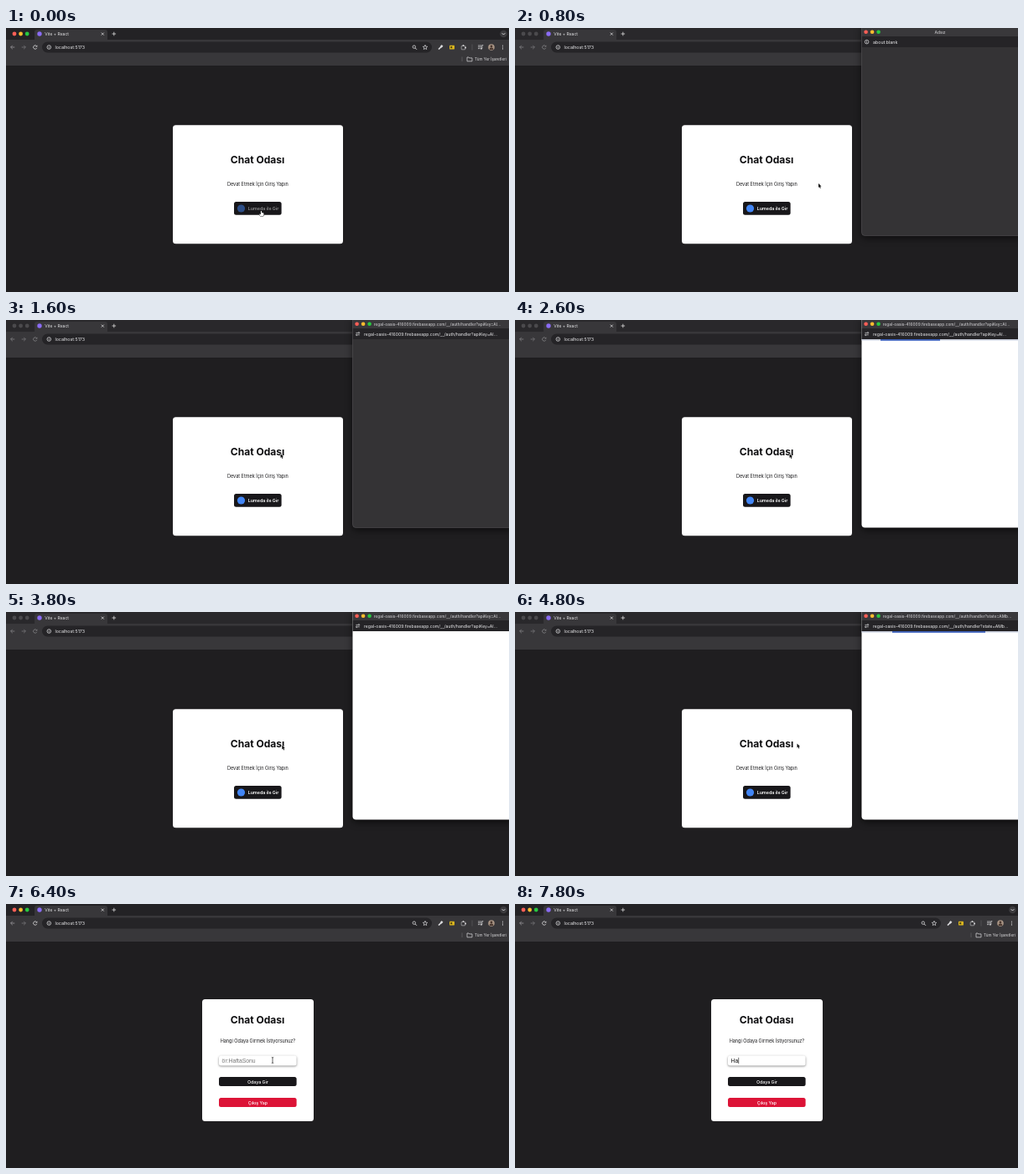
Animation of 600x316 px, one loop 8 s. Source, as an HTML page with a canvas:

```html
<!DOCTYPE html>
<html lang="tr">
<head>
<meta charset="utf-8">
<title>Chat Odası</title>
<style>
html, body { margin: 0; width: 100%; height: 100%; overflow: hidden; background: #1f1e20; }
canvas { display: block; width: 600px; height: 316px; }
</style>
</head>
<body>
<canvas id="stage"></canvas>
<script>
const W = 600, H = 316, LOOP = 8000, STEP = 200;
const canvas = document.getElementById('stage');
const ctx = canvas.getContext('2d');
const ratio = window.devicePixelRatio || 1;
canvas.width = W * ratio;
canvas.height = H * ratio;

const UI = 'Inter, "Noto Sans", sans-serif';
const INPUT = '"Liberation Sans", Arial, sans-serif';
const BAR = '#38373a', FIELD = '#252427', PAGE = '#1f1e20';
const LIGHTS = ['#ff5f57', '#febc2e', '#28c840'];
const HOST = 'regal-oasis-416009.firebaseapp.com/__/auth/handler?';

// Pointer path: time, x, y of the tip
const PATH = [
  [0, 304.5, 219], [600, 304.5, 219], [800, 362, 186], [1000, 429, 146.5],
  [1200, 408, 152], [1400, 352, 159], [1600, 327.5, 160], [3600, 327.5, 160],
  [4600, 336.5, 157.5], [5000, 336.5, 157.5], [5800, 318, 187], [8000, 318, 187]
];

function box(x, y, w, h, r, fill, stroke) {
  ctx.beginPath();
  ctx.roundRect(x, y, w, h, r);
  if (fill) { ctx.fillStyle = fill; ctx.fill(); }
  if (stroke) { ctx.strokeStyle = stroke; ctx.lineWidth = 0.5; ctx.stroke(); }
}

function dot(x, y, r, fill) {
  ctx.beginPath();
  ctx.arc(x, y, r, 0, Math.PI * 2);
  ctx.fillStyle = fill;
  ctx.fill();
}

function ring(x, y, r, color, from = 0, to = Math.PI * 2) {
  ctx.beginPath();
  ctx.arc(x, y, r, from, to);
  ctx.strokeStyle = color;
  ctx.lineWidth = 0.8;
  ctx.stroke();
}

function line(color, width, ...pts) {
  ctx.beginPath();
  for (let i = 0; i < pts.length; i += 2) ctx.lineTo(pts[i], pts[i + 1]);
  ctx.strokeStyle = color;
  ctx.lineWidth = width;
  ctx.stroke();
}

function shape(x, y, pts, fill, stroke, width = 0.6) {
  ctx.beginPath();
  for (let i = 0; i < pts.length; i += 2) ctx.lineTo(x + pts[i], y + pts[i + 1]);
  ctx.closePath();
  ctx.lineJoin = 'round';
  ctx.lineWidth = width;
  if (stroke) { ctx.strokeStyle = stroke; ctx.stroke(); }
  if (fill) { ctx.fillStyle = fill; ctx.fill(); }
}

function text(str, x, y, size, color, weight = 400, align = 'left', family = UI) {
  ctx.font = `${weight} ${size}px ${family}`;
  ctx.textAlign = align;
  ctx.fillStyle = color;
  ctx.fillText(str, x, y);
}

function withShadow(color, blur, dy, draw) {
  ctx.save();
  ctx.shadowColor = color;
  ctx.shadowBlur = blur * ratio;
  ctx.shadowOffsetY = dy * ratio;
  draw();
  ctx.restore();
}

function infoIcon(x, y) {
  ring(x, y, 2.3, '#d5d5d7');
  line('#d5d5d7', 0.8, x, y - 0.4, x, y + 1.3);
  dot(x, y - 1.1, 0.45, '#d5d5d7');
}

function tuneIcon(x, y) {
  const c = '#d5d5d7';
  line(c, 0.7, x - 2.2, y - 1.2, x + 0.2, y - 1.2);
  line(c, 0.7, x - 0.2, y + 1.2, x + 2.2, y + 1.2);
  ring(x + 1.3, y - 1.2, 0.8, c);
  ring(x - 1.3, y + 1.2, 0.8, c);
}

function star(x, y, r, color) {
  const pts = [];
  for (let i = 0; i < 10; i++) {
    const a = i * Math.PI / 5 - Math.PI / 2, d = i % 2 ? r * 0.45 : r;
    pts.push(d * Math.cos(a), d * Math.sin(a));
  }
  shape(x, y, pts, null, color, 0.7);
}

function toolIcons() {
  const c = '#dcdcde';
  ring(486.8, 22.6, 1.7, c);
  line(c, 0.9, 488.1, 23.9, 490, 25.8);
  star(500, 23.2, 2.9, c);
  line(c, 1.7, 516, 25.5, 519, 22.5);
  line(c, 2.4, 518.6, 22.8, 520.6, 20.8);
  box(529, 20.8, 6, 4.6, 0.6, '#d9b51f');
  box(530.2, 22, 2, 2.2, 0, '#54480f');
  box(543.2, 21.4, 4.6, 4.4, 0.6, null, c);
  dot(545.5, 20.9, 0.9, c);
  dot(548.1, 23.5, 0.9, c);
  line('#5d5d60', 0.7, 556, 19.5, 556, 26.5);
  for (let i = 0; i < 3; i++) line(c, 0.7, 563, 21 + i * 1.8, i < 2 ? 567 : 565.5, 21 + i * 1.8);
  line(c, 0.8, 567.8, 24.6, 567.8, 20.6, 569.3, 20.6);
  dot(567, 24.7, 0.9, c);
  dot(579, 23, 3.8, '#a89484');
  dot(579, 21.9, 1.4, '#4a3830');
  box(576.7, 23.6, 4.6, 2.4, [1.6, 1.6, 0.8, 0.8], '#4a3830');
  for (let i = -1; i < 2; i++) dot(592.5, 23 + i * 1.9, 0.6, c);
}

function browser(active) {
  ctx.fillStyle = PAGE;
  ctx.fillRect(0, 0, W, H);
  ctx.fillStyle = active ? '#232225' : '#29282b';
  ctx.fillRect(0, 0, W, 15);
  ctx.fillStyle = BAR;
  ctx.fillRect(0, 14, W, 31);
  for (let i = 0; i < 3; i++) dot(10 + i * 7.6, 7, 2.4, active ? LIGHTS[i] : '#4b4a4d');

  box(34, 2, 87, 13, [3, 3, 0, 0], BAR);
  dot(40, 7, 2.7, '#8b6cf6');
  text('Vite + React', 46.2, 9, 5, '#e6e6e8');
  line('#dcdcde', 0.8, 113.8, 5.6, 116.8, 8.6);
  line('#dcdcde', 0.8, 116.8, 5.6, 113.8, 8.6);
  line('#dcdcde', 0.8, 126.5, 7, 131.1, 7);
  line('#dcdcde', 0.8, 128.8, 4.7, 128.8, 9.3);
  dot(593.5, 7, 4.3, '#3c3b3e');
  line('#e6e6e8', 0.9, 591.7, 6.2, 593.5, 8, 595.3, 6.2);

  const back = active ? '#9a999c' : '#858487', dim = '#77767a';
  line(back, 0.8, 10.3, 23, 5.6, 23);
  line(back, 0.8, 7.8, 20.8, 5.6, 23, 7.8, 25.2);
  line(dim, 0.8, 18.7, 23, 23.4, 23);
  line(dim, 0.8, 21.2, 20.8, 23.4, 23, 21.2, 25.2);
  const reload = active ? '#dcdcde' : '#858487';
  ring(34.8, 23, 2.2, reload, 0.4, 5.4);
  shape(36.4, 20.4, [0.9, 0, 0.9, 2.1, -1.2, 2.1], reload);

  box(43, 16.5, 465, 13, 6.5, FIELD);
  infoIcon(51.3, 23);
  text('localhost:5173', 58.4, 25, 5.3, '#eeeef0');
  if (active) toolIcons();

  line('#68676a', 0.7, 544, 34.5, 544, 40);
  shape(550, 35, [0, 0, 2, 0, 2.8, 0.9, 6, 0.9, 6, 4.8, 0, 4.8], null, '#dcdcde', 0.7);
  text('Tüm Yer İşaretleri', 559, 39, 4.6, '#dcdcde');
}

function loginCard(hover) {
  box(199, 116.3, 203, 142, 3.5, '#fff');
  text('Chat Odası', 300, 162, 12, '#0c0c0e', 700, 'center');
  text('Devat Etmek İçin Giriş Yapın', 300.4, 189, 5.5, '#18181a', 400, 'center');
  box(272, 208, 56.6, 15.8, 2.5, '#18171a');
  ctx.globalAlpha = hover ? 0.5 : 1;
  dot(280.5, 216, 4.6, '#4285f4');
  text('Lumeda ile Gir', 288.8, 217.9, 5.3, '#fff', 600);
  ctx.globalAlpha = 1;
}

function roomCard(t) {
  box(234, 114, 133, 146, 3.5, '#fff');
  text('Chat Odası', 300, 143, 12, '#0c0c0e', 700, 'center');
  text('Hangi Odaya Girmek İstiyorsunuz?', 300.4, 166, 5.5, '#18181a', 400, 'center');
  withShadow('rgba(0,0,0,.5)', 2.5, 0.8, () => box(254, 181.6, 92.6, 11.8, 2.5, '#fff'));
  const typed = t < 7400 ? '' : t < 7600 ? 'H' : 'Ha';
  text(typed || 'ör:HaftaSonu', 257.6, 189.7, 6.8, typed ? '#111' : '#757575', 400, 'left', INPUT);
  const caretOn = t >= 6000 && !(t >= 6400 && t < 6800);
  if (caretOn) {
    const x = 258 + (typed ? ctx.measureText(typed).width : 0);
    line('#111', 0.6, x, 183.8, x, 191.2);
  }
  box(254, 207, 92.6, 11, 2.5, '#18171a');
  text('Odaya Gir', 300.4, 214.5, 5.3, '#fff', 500, 'center');
  box(254, 232, 92.6, 11, 2.5, '#dc1437');
  text('Çıkış Yap', 300.4, 239.5, 5.3, '#fff', 500, 'center');
}

// Visible span of the loading bar, or null
function progress(t) {
  if (t >= 2600 && t < 3200) return [436 + (t - 2600) * 0.13, 507 + (t - 2600) * 0.15];
  if (t >= 4600) return t < 4800 ? [413.5, 470] : [450, 561];
  return null;
}

function popup(t) {
  const blank = t < 1400, loaded = t >= 2600;
  withShadow('rgba(0,0,0,.6)', 9, 3, () => box(413.5, -4, 192, 252.6, 4, '#343335'));
  ctx.save();
  ctx.beginPath();
  ctx.roundRect(413.5, -4, 192, 252.6, 4);
  ctx.clip();
  ctx.fillStyle = loaded ? '#fff' : '#343335';
  ctx.fillRect(413, 0, 187, 250);
  ctx.fillStyle = '#39383b';
  ctx.fillRect(413, 0, 187, 10);
  ctx.fillStyle = FIELD;
  ctx.fillRect(413, 10, 187, 13);
  const span = progress(t);
  if (span) {
    ctx.fillStyle = '#c9cfdd';
    ctx.fillRect(413, 23, 187, 1.6);
    ctx.fillStyle = '#3f63bd';
    ctx.fillRect(span[0], 23, span[1] - span[0], 1.8);
  }
  ctx.restore();
  if (!loaded) box(413.5, -4, 192, 252.6, 4, null, '#5a595c');
  for (let i = 0; i < 3; i++) dot(418.6 + i * 7.5, 4.8, 2.3, LIGHTS[i]);
  if (blank) {
    text('Adsız', 507, 6.6, 4.8, '#b4b3b6', 600, 'center');
    infoIcon(419.6, 16.6);
    text('about:blank', 427, 18.5, 5.3, '#eeeef0');
  } else {
    const url = HOST + (t < 4600 ? 'apiKey=AI…' : 'state=AMb…');
    text(url, 438.8, 6.6, 4.7, '#b4b3b6', 600);
    tuneIcon(419.6, 16.6);
    text(url, 427, 18.5, 5.1, '#eeeef0');
  }
}

function pointerAt(t) {
  const i = PATH.findIndex(p => p[0] > t);
  const [t0, x0, y0] = PATH[i - 1], [t1, x1, y1] = PATH[i];
  const k = (t - t0) / (t1 - t0);
  return [x0 + (x1 - x0) * k, y0 + (y1 - y0) * k];
}

function pointer(t) {
  if (t >= 7400) return;
  const [x, y] = pointerAt(t);
  if (t < 800 || (t >= 5000 && t < 5200)) {
    shape(x, y, [-0.6, 0, 0.4, 0, 0.6, 2, 2.8, 2.6, 3, 4.6, 2.2, 6.4, -0.8, 6.4, -2.4, 4, -1.8, 3.4, -0.6, 4.2], '#fff', '#111', 1);
  } else if (t >= 5800) {
    line('#222', 0.7, x - 1.2, y - 3.6, x, y - 3, x + 1.2, y - 3.6);
    line('#222', 0.7, x, y - 3, x, y + 3);
    line('#222', 0.7, x - 1.2, y + 3.6, x, y + 3, x + 1.2, y + 3.6);
  } else {
    shape(x, y, [0, 0, 0, 5, 1.1, 4, 1.9, 5.9, 2.8, 5.5, 2, 3.7, 3.5, 3.6], '#0a0a0a', '#fff', 1);
  }
}

function frame(now) {
  const t = Math.floor(now % LOOP / STEP) * STEP;
  const popupOpen = t >= 800 && t < 5000;
  ctx.setTransform(ratio, 0, 0, ratio, 0, 0);
  browser(!popupOpen);
  if (t < 5000) loginCard(t < 800);
  else roomCard(t);
  if (popupOpen) popup(t);
  pointer(t);
}

const start = performance.now();
function tick() {
  frame(performance.now() - start);
  requestAnimationFrame(tick);
}
tick();
</script>
</body>
</html>
```
